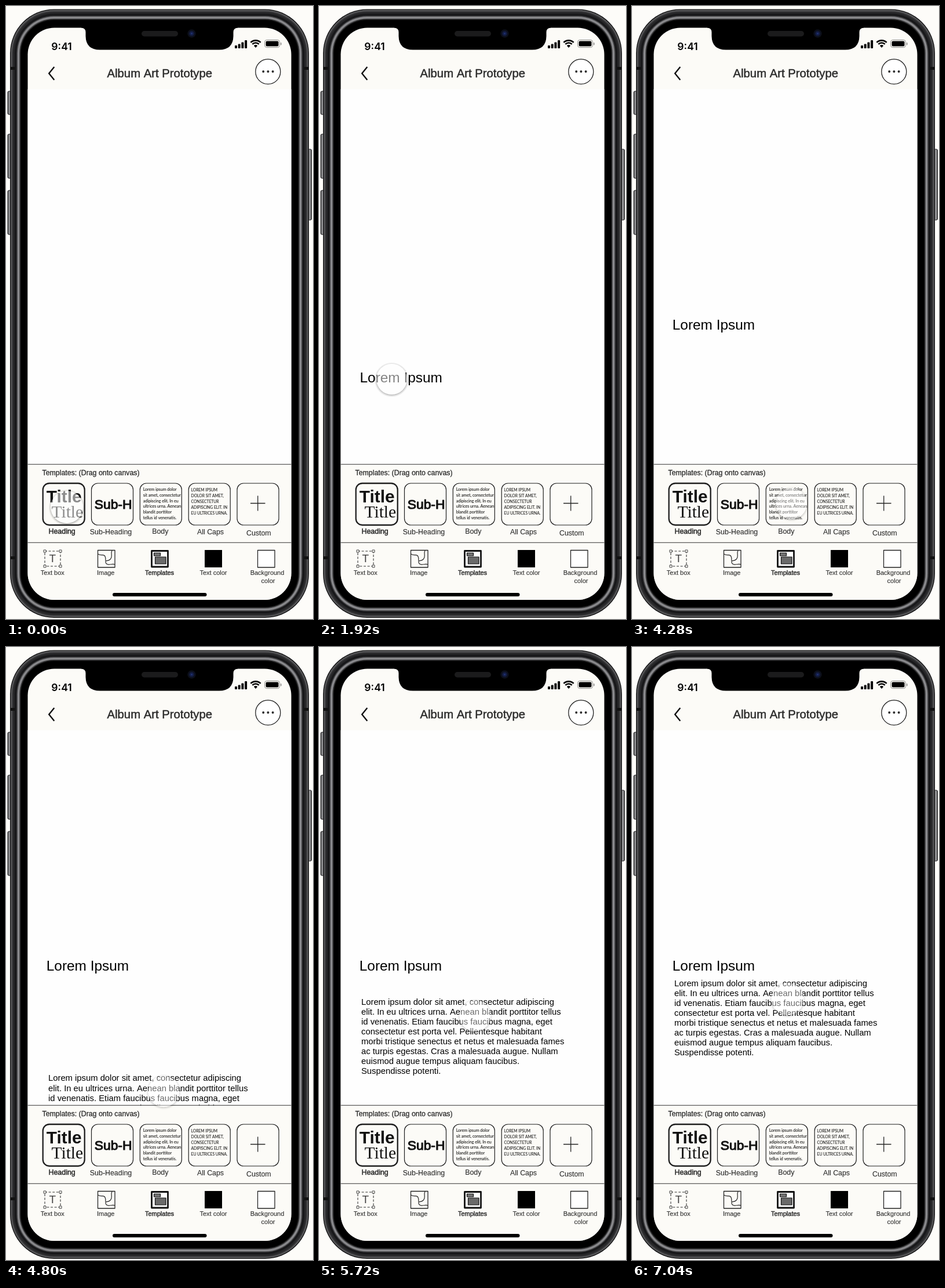
These frames come from a looping animation (530 by 1057 pixels, 7.64 s). An HTML page with a canvas:

```html
<!DOCTYPE html>
<html lang="en">
<head>
<meta charset="utf-8">
<title>Album Art Prototype</title>
<style>
html, body { margin: 0; width: 100%; height: 100%; overflow: hidden; background: #fdfcf9; }
canvas { display: block; width: 530px; height: 1057px; }
</style>
</head>
<body>
<canvas id="stage"></canvas>
<script>
const W = 530, H = 1057, LOOP = 7640, STEP = 40;
const SANS = '"Liberation Sans", Arial, sans-serif';
const SERIF = '"Liberation Serif", Times, serif';
const SMALL = 'Lato, sans-serif';
const INK = '#2b2b2b', PAPER = '#fcfbf7';

const canvas = document.getElementById('stage');
const dpr = window.devicePixelRatio || 1;
canvas.width = W * dpr;
canvas.height = H * dpr;
const ctx = canvas.getContext('2d');
ctx.scale(dpr, dpr);

function rect(x, y, w, h, r, fill, line, width = 1.2) {
  ctx.beginPath();
  ctx.roundRect(x, y, w, h, r);
  paint(fill, line, width);
}

function disc(x, y, r, fill, line, width = 1.2) {
  ctx.beginPath();
  ctx.arc(x, y, r, 0, Math.PI * 2);
  paint(fill, line, width);
}

function paint(fill, line, width) {
  if (fill) { ctx.fillStyle = fill; ctx.fill(); }
  if (line) { ctx.strokeStyle = line; ctx.lineWidth = width; ctx.stroke(); }
}

function path(d, line, width) {
  ctx.strokeStyle = line;
  ctx.lineWidth = width;
  ctx.stroke(new Path2D(d));
}

// "heavy" thickens a regular face to a medium weight
function text(str, x, y, size, { family = SANS, weight = 400, color = INK, align = 'left', heavy = 0 } = {}) {
  ctx.font = `${weight} ${size}px ${family}`;
  ctx.textAlign = align;
  ctx.fillStyle = color;
  ctx.fillText(str, x, y);
  if (heavy) {
    ctx.strokeStyle = color;
    ctx.lineWidth = heavy;
    ctx.lineJoin = 'round';
    ctx.strokeText(str, x, y);
  }
}

function lines(rows, x, y, pitch, size, style) {
  rows.forEach((row, i) => text(row, x, y + i * pitch, size, style));
}

// Smooth monotone curve through [time, x, y] keys
function track(keys) {
  const slope = (i, c) => (keys[i + 1][c] - keys[i][c]) / (keys[i + 1][0] - keys[i][0]);
  const tangent = (i, c) => {
    if (i === 0 || i === keys.length - 1) return 0;
    const a = slope(i - 1, c), b = slope(i, c);
    return a * b > 0 ? 2 * a * b / (a + b) : 0;
  };
  return t => {
    const last = keys[keys.length - 1];
    if (t <= keys[0][0]) return keys[0].slice(1);
    if (t >= last[0]) return last.slice(1);
    const i = keys.findIndex(k => k[0] > t) - 1;
    const span = keys[i + 1][0] - keys[i][0], u = (t - keys[i][0]) / span;
    return [1, 2].map(c => {
      const a = keys[i][c], b = keys[i + 1][c];
      const s = u * u * (3 - 2 * u);
      return a + (b - a) * s
        + span * u * (1 - u) * ((1 - u) * tangent(i, c) - u * tangent(i + 1, c));
    });
  };
}

const touchAt = track([
  [680, 105, 864], [1240, 113, 786], [1480, 118, 743], [2280, 132, 562], [2320, 133, 554.5],
  [3080, 133, 554.5], [3860, 275.5, 861],
  [4240, 275.5, 861], [4280, 275, 858], [5040, 271, 721], [5200, 270, 697],
  [5720, 269.5, 636], [5840, 269.2, 624], [6320, 268.6, 607.6], [6480, 268.5, 607]
]);
const headingAt = track([
  [680, 72.5, 880], [1240, 71.5, 797], [1480, 71, 753], [2280, 70, 565], [2320, 69.8, 557.5]
]);
const bodyAt = track([
  [4240, 73, 843], [4280, 73, 840], [5040, 73, 703], [5200, 73, 678.5],
  [5720, 73, 616.5], [5840, 73, 604], [6320, 73, 585.7], [6480, 73, 584.7]
]);

const BODY = [
  'Lorem ipsum dolor sit amet, consectetur adipiscing',
  'elit. In eu ultrices urna. Aenean blandit porttitor tellus',
  'id venenatis. Etiam faucibus faucibus magna, eget',
  'consectetur est porta vel. Pellentesque habitant',
  'morbi tristique senectus et netus et malesuada fames',
  'ac turpis egestas. Cras a malesuada augue. Nullam',
  'euismod augue tempus aliquam faucibus.',
  'Suspendisse potenti.'
];
const BODY_THUMB = ['Lorem ipsum dolor', 'sit amet, consectetur', 'adipiscing elit. In eu',
  'ultrices urna. Aenean', 'blandit porttitor', 'tellus id venenatis.'];
const CAPS_THUMB = ['LOREM IPSUM', 'DOLOR SIT AMET,', 'CONSECTETUR', 'ADIPISCING ELIT. IN', 'EU ULTRICES URNA.'];

function sideButton(x, y, h) {
  const g = ctx.createLinearGradient(x, 0, x + 6, 0);
  g.addColorStop(0, '#4a4a4c');
  g.addColorStop(0.5, '#a5a5a7');
  g.addColorStop(1, '#4a4a4c');
  rect(x, y, 6, h, 2, g, '#161618', 1);
}

function drawBody() {
  [[147, 40], [221, 76], [318, 76]].forEach(([y, h]) => sideButton(3, y, h));
  sideButton(521.5, 247, 122);
  const rings = [[0, '#0c0c0d'], [1.3, '#5c5c5e'], [3.2, '#3a3a3c'], [5, '#262628'], [8, '#171719'],
    [11, '#343436'], [12.5, '#7c7c7f'], [14, '#8f8f92'], [16, '#4a4a4c'], [17.5, '#111'], [19, '#000']];
  rings.forEach(([i, color]) => rect(7 + i, 5.5 + i, 516 - 2 * i, 1049.5 - 2 * i, 76 - i, color));
  ctx.fillStyle = '#111';
  [105, 949].forEach(y => {
    ctx.fillRect(7, y, 8, 5);
    ctx.fillRect(515, y, 8, 5);
  });
}

function screenPath() {
  ctx.beginPath();
  ctx.roundRect(37.5, 37.5, 455, 986.5, 46);
}

function drawNotch() {
  ctx.fillStyle = '#000';
  ctx.fill(new Path2D('M130 36H400V37.5Q392.5 38 392.5 45V52Q392 75.5 368 75.5H162Q138 75.5 137.5 52V45Q137.5 38 130 37.5Z'));
  rect(234, 43, 63, 9.5, 4.7, '#1b1b1c');
  disc(320.5, 47.5, 7.2, '#0c0f1a');
  disc(320.5, 47.5, 4.3, '#131c42');
  disc(320.5, 47.5, 1.8, '#1f2f6b');
}

function drawStatus() {
  text('9:41', 78.3, 76.2, 17.6, { family: 'Inter, sans-serif', weight: 600, color: '#000' });
  [5, 7.5, 10.5, 14].forEach((h, i) => rect(395 + i * 5.7, 73 - h, 4, h, 1, '#000'));
  ctx.strokeStyle = '#000';
  ctx.lineWidth = 2.7;
  [12.2, 8].forEach(r => {
    ctx.beginPath();
    ctx.arc(431, 71.5, r, -Math.PI * 0.75, -Math.PI * 0.25);
    ctx.stroke();
  });
  ctx.beginPath();
  ctx.moveTo(431, 72);
  ctx.arc(431, 71.5, 4.4, -Math.PI * 0.75, -Math.PI * 0.25);
  paint('#000');
  rect(446.5, 58.5, 26, 13, 3.8, null, '#8d8d8b', 1);
  rect(448.5, 60.5, 22, 9, 2, '#000');
  rect(474, 63, 1.5, 4.5, 0.8, '#8d8d8b');
}

function drawHeader() {
  path('M83.3 105L74.2 116.2L83.3 127.6', '#111', 2.4);
  text('Album Art Prototype', 265.3, 122.5, 20.3, { align: 'center', heavy: 0.5 });
  disc(452.3, 113.2, 21.5, '#fff', '#222', 1.3);
  [444.2, 452.4, 460.6].forEach(x => disc(x, 113, 2, INK));
}

function thumb(x, selected, draw) {
  ctx.save();
  rect(x, 823, 72, 72, 11, PAPER);
  ctx.clip();
  draw();
  ctx.restore();
  rect(x, 823, 72, 72, 11, null, '#1e1e1e', selected ? 2.3 : 1.2);
}

function drawTemplates() {
  text('Templates: (Drag onto canvas)', 62.5, 809.3, 12.35, { heavy: 0.3 });
  thumb(63.7, true, () => {
    text('Title', 69.8, 856, 29.8, { weight: 700, color: '#111' });
    text('Title', 78.5, 881.5, 29.5, { family: SERIF, color: '#111' });
  });
  thumb(147.5, false, () => text('Sub-H', 152.8, 867, 22.8, { color: '#111', heavy: 1.1 }));
  thumb(231.3, false, () => lines(BODY_THUMB, 236.7, 836.3, 9.65, 7.1,
    { family: SMALL, color: '#1a1a1a', heavy: 0.1 }));
  thumb(315.2, false, () => lines(CAPS_THUMB, 319.5, 837, 9.9, 6.75, { family: SMALL, color: '#222', heavy: 0.1 }));
  thumb(399, false, () => path('M422 857.5H447.5M434.7 844.5V870.5', '#222', 1.3));

  const label = (str, x, y, heavy) => text(str, x, y, 12.4, { align: 'center', heavy });
  label('Heading', 96.6, 910, 0.5);
  label('Sub-Heading', 181, 911, 0.1);
  label('Body', 266.3, 910, 0.1);
  label('All Caps', 353, 911, 0.1);
  label('Custom', 436.3, 913, 0.1);
}

function drawTools() {
  ctx.setLineDash([4, 2.6]);
  rect(67, 940, 27, 26, 0, null, '#333', 1.1);
  ctx.setLineDash([]);
  [67, 94].forEach(x => [940, 966].forEach(y => rect(x - 2, y - 2, 4, 4, 0, PAPER, '#333', 0.9)));
  text('T', 80.3, 959.3, 19, { align: 'center', color: '#444' });

  rect(158.5, 938.5, 29.5, 29.5, 0, PAPER, '#222', 1.3);
  path('M159 945C164 949 169 944 171 949C174 956 169 961 176 963C180 964 184 961 188 963M183 939C180 944 185 949 180 954C177 957 174 956 173 957', '#222', 1.2);

  rect(251.5, 939.5, 28, 27.5, 0, '#fff', '#111', 2.8);
  rect(255.5, 943, 11, 5, 0, '#777', '#111', 1.2);
  rect(257.5, 950, 18.5, 12, 0, '#6a6a6a', '#111', 1.2);

  rect(343, 938, 30, 30, 0, '#000');
  rect(434.5, 938.5, 29.5, 29.5, 0, '#fff', '#222', 1.3);

  const label = (str, x, y = 981, heavy = 0.1) => text(str, x, y, 11, { align: 'center', heavy });
  label('Text box', 80.3);
  label('Image', 172.2);
  label('Templates', 265, 981, 0.45);
  label('Text color', 358);
  label('Background', 451, 981.3);
  label('color', 452.5, 995);
}

function drawTouch(t) {
  const [x, y] = touchAt(t);
  let r = 28, shade = 0.3, veil = 0.52;
  if (t >= 7040) { shade = 0.18; veil = 0.42; }
  else if (t >= 3960) { r = 27; shade = 0.18; veil = 0.42; }
  else if (t >= 2840) { shade = 0.38; veil = 0.58; }
  else if (t >= 540) { r = 26.5; }

  ctx.save();
  ctx.beginPath();
  ctx.rect(x - 40, y - 40, 80, 80);
  ctx.arc(x, y, r, 0, Math.PI * 2);
  ctx.clip('evenodd');
  const g = ctx.createRadialGradient(x, y + 1, r - 1, x, y + 1, r + 3.5);
  g.addColorStop(0, `rgba(0,0,0,${shade})`);
  g.addColorStop(0.4, `rgba(0,0,0,${shade * 0.45})`);
  g.addColorStop(1, 'rgba(0,0,0,0)');
  disc(x, y + 1, r + 4, g);
  ctx.restore();
  disc(x, y, r, `rgba(255,255,255,${veil})`);
}

function draw(t) {
  ctx.fillStyle = '#fdfcf9';
  ctx.fillRect(0, 0, W, H);
  drawBody();

  ctx.save();
  screenPath();
  ctx.clip();
  ctx.fillStyle = PAPER;
  ctx.fillRect(37, 37, 456, 988);
  ctx.fillStyle = '#fefefe';
  ctx.fillRect(37, 143.5, 456, 647);

  if (t >= 720) text('Lorem Ipsum', ...headingAt(t), 24.4, { color: '#000' });
  if (t >= 4280) lines(BODY, ...bodyAt(t), 17.1, 14.8, { color: '#000' });

  ctx.fillStyle = PAPER;
  ctx.fillRect(37, 790, 456, 235);
  path('M37 790.3H493M37 925.3H493', '#333', 1.1);
  drawHeader();
  drawStatus();
  drawTemplates();
  drawTools();
  rect(184, 1012, 162.5, 6, 3, '#000');
  drawTouch(t);
  ctx.restore();
  drawNotch();
}

const start = performance.now();
function tick() {
  const t = (performance.now() - start) % LOOP;
  draw(Math.floor(t / STEP) * STEP);
  requestAnimationFrame(tick);
}
tick();
</script>
</body>
</html>
```
